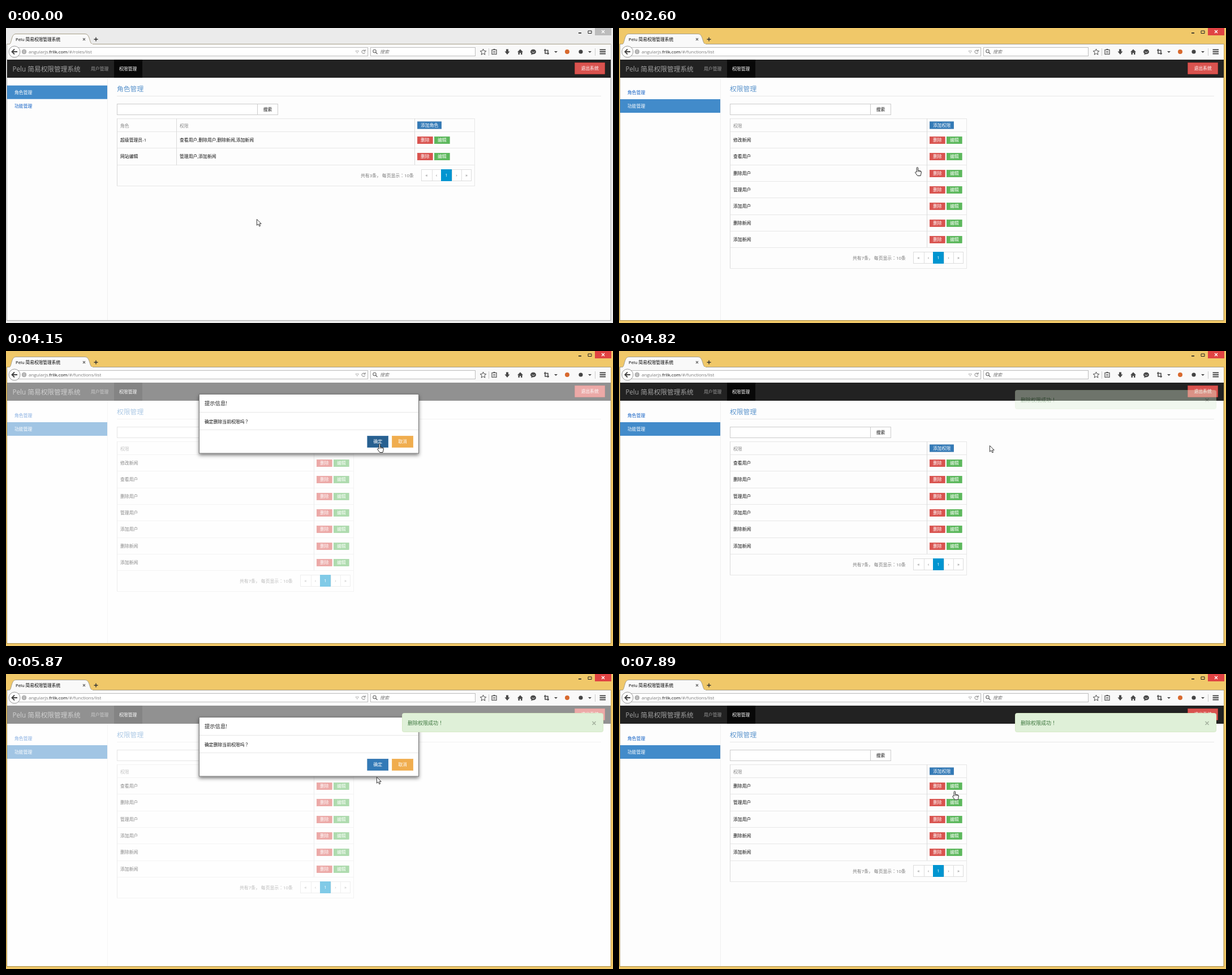
Recreate the animation shown at these times as an HTML page. Size 1073 by 522 pixels, loop 8000 ms.

```html
<!DOCTYPE html>
<html lang="zh-CN">
<head>
<meta charset="utf-8">
<title>权限管理</title>
<style>
html, body { margin: 0; width: 100%; height: 100%; overflow: hidden; background: #ebebeb; }
svg { display: block; width: 1073px; height: 522px; }
text { font-family: "Open Sans", "Noto Sans CJK SC", "Noto Sans CJK", sans-serif; white-space: pre; }
.mark { font-family: "Noto Sans CJK TC", "Noto Sans CJK", sans-serif; }
</style>
</head>
<body>
<svg id="stage" viewBox="0 0 1073 522" xmlns="http://www.w3.org/2000/svg"></svg>
<script>
const FS = 7.84;
const RED = '#d9534f', GREEN = '#5cb85c', BLUE = '#337ab7', LINE = '#e7e7e7', BAR = '#dadada';
const EDGE = { [RED]: '#d43f3a', [GREEN]: '#4cae4c', [BLUE]: '#2e6da4' };

// these marks sit in the middle of their square
const marks = s => s.replace(/[：？！]/g, '<tspan class="mark" lang="zh-TW">$&</tspan>');
// y is the vertical middle of the glyphs
const text = (x, y, s, fill = '#111', size = FS, more = '') =>
  `<text x="${x}" y="${(y + size * .37).toFixed(2)}" font-size="${size}" fill="${fill}" ${more}>${marks(s)}</text>`;
const mid = (x, y, s, fill, size, more = '') => text(x, y, s, fill, size, 'text-anchor="middle" ' + more);
const rect = (x, y, w, h, fill, more = '') =>
  `<rect x="${x}" y="${y}" width="${w}" height="${h}" fill="${fill}" ${more}/>`;
const frame = (x, y, w, h, color, fill = '#fff') => rect(x + .5, y + .5, w - 1, h - 1, fill, `stroke="${color}"`);
const hline = (x1, x2, y, c = LINE) => rect(x1, y, x2 - x1, 1, c);
const vline = (x, y1, y2, c = LINE) => rect(x, y1, 1, y2 - y1, c);
const path = (d, stroke, fill = 'none', w = 1, more = '') =>
  `<path d="${d}" stroke="${stroke}" fill="${fill}" stroke-width="${w}" ${more}/>`;
const dot = (x, y, r, fill, more = '') => `<circle cx="${x}" cy="${y}" r="${r}" fill="${fill}" ${more}/>`;
const group = (id, body, more = '') => `<g id="${id}" ${more}>${body}</g>`;
const plate = (x, y, w, h, fill, more = '') =>
  rect(x + .3, y + .3, w - .6, h - .6, fill, `stroke="${EDGE[fill] || fill}" stroke-width=".6" ${more}`);
const button = (x, y, w, h, s, fill, more = '') =>
  plate(x, y, w, h, fill, more) + mid(x + w / 2, y + h / 2, s, '#fff', FS, 'font-weight="500"');

const APP = 'Pelu 简易权限管理系统';
const HOST = '<tspan fill="#777">angularjs.</tspan><tspan fill="#111" font-weight="500">frllk.com</tspan>';

function toolbar() {
  const ink = '#4a4a4a';
  const caret = x => path(`M${x - 3} 41h6l-3 3z`, 'none', ink);
  return rect(2, 28, 1067, 28, '#f9f9f9')
    + path('M2 28.5H6C10 28.5 9 10.5 17 10.5H140C149 10.5 147 28.5 153 28.5H1069', '#a8a08a', '#f9f9f9')
    + rect(7, 28, 146, 2, '#f9f9f9')
    + text(17, 20, APP, '#000', 7.7)
    + path('M136 18l4 4m0-4l-4 4', '#666', 'none', 1.1)
    + path('M155.5 20h7M159 16.5v7', '#333', 'none', 1.4)
    + frame(18, 34, 622, 16, '#bdbdbd')
    + dot(15, 42, 10, '#fdfdfd', 'stroke="#999"')
    + path('M20 42H11M15 37.5L10.5 42l4.5 4.5', '#444', 'none', 1.9)
    + dot(32, 42, 4.2, '#999')
    + path('M28 42h8M32 38v8M29 40h6M29 44h6', '#eee', 'none', .6)
    + path('M618 40.5h5.5l-2.7 4z', '#aaa', 'none', .8)
    + path('M634.5 40.5a3 3 0 1 0 .3 2.8M635 38v3h-3', '#777')
    + frame(644, 34, 186, 16, '#bdbdbd')
    + dot(651.5, 41, 2.7, 'none', 'stroke="#666" stroke-width="1.1"')
    + path('M653.5 43l3 3', '#666', 'none', 1.3)
    + text(661, 42, '搜索', '#777', 8, 'font-style="italic"')
    + path('M843.5 37l1.5 3.5 3.8.4-2.9 2.5.9 3.8-3.3-2-3.3 2 .9-3.8-2.9-2.5 3.8-.4z', ink)
    + vline(853, 36, 49, '#ccc')
    + path('M859 38.5h8v8h-8zM861 41.5h4M861 44h4', ink, 'none', 1.2) + rect(861.5, 37, 3, 2, ink)
    + path('M884 37.5h4v4h2.5l-4.5 5.5-4.5-5.5h2.5z', 'none', ink)
    + path('M904 42.5l5-5 5 5h-1.5v4.5h-2.5v-3h-2v3h-2.5v-4.5z', 'none', ink)
    + `<ellipse cx="932" cy="42" rx="5" ry="4.3" fill="${ink}"/>`
    + path('M929.5 42q2.5 3 5 0', '#fff', 'none', .8) + path('M929 45l-1 2.5 4-1.5z', 'none', ink)
    + path('M953 37v8h7M951 39.5h7v7.5', ink, 'none', 1.6)
    + caret(972) + dot(992, 42, 4, '#d8692e') + dot(1016, 42, 3.6, '#444') + caret(1032)
    + vline(1041, 36, 49, '#ccc')
    + path('M1049.5 38.5h10.5M1049.5 42h10.5M1049.5 45.5h10.5', ink, 'none', 1.8);
}

function chrome() {
  return rect(0, 0, 1073, 522, '#ebebeb', 'id="skin"')
    + rect(1041, 0, 29, 13, '#bcbcbc', 'id="close"')
    + path('M1053 4l5 5m0-5l-5 5', '#fff', 'none', 1.3)
    + rect(1012, 8, 5, 1.6, '#222')
    + path('M1029 5h6v4.5h-6z', '#222')
    + rect(1.5, 28.5, 1067.5, 489, '#fdfdfd', 'id="edge" stroke="#aaa"')
    + toolbar()
    + `<text x="40" y="45" font-size="8" fill="#777">${HOST}/#/<tspan id="route"></tspan></text>`;
}

function navbar() {
  return rect(2, 56, 1067, 32, '#222')
    + text(11.5, 72.5, APP, '#a0a0a0', 11.7)
    + text(150, 72, '用户管理', '#999')
    + rect(191, 56, 50, 32, '#080808') + text(200, 72, '权限管理', '#fff', FS, 'font-weight="500"')
    + button(1005.4, 61, 53.4, 20.8, '退出系统', RED);
}

function table(x2, bar, rows, total, add, head, cell) {
  const rowY = i => Math.round(184 + i * 29.35) - 1;
  const foot = rowY(rows.length), end = foot + 37;
  let out = head + plate(bar + 5, 165.5, 43, 13, BLUE) + text(bar + 11, 172, add, '#fff', FS, 'font-weight="500"');
  rows.forEach((r, i) => {
    const cy = rowY(i) + 15.5;
    out += hline(196, x2, rowY(i)) + cell(r, cy)
      + button(bar + 5, cy - 6.5, 27.5, 13, '删除', RED, i ? '' : 'class="del"')
      + button(bar + 35, cy - 6.5, 27.5, 13, '编辑', GREEN);
  });
  out += hline(196, x2, 160) + hline(196, x2, foot) + hline(196, x2, end)
    + vline(196, 160, end, BAR) + vline(x2 - 1, 160, end) + vline(bar, 160, foot, BAR);
  const py = foot + 8, stops = [0, 19, 35, 54, 71, 89];
  out += text(x2 - 202, py + 11, `共有${total}条， 每页显示：10条`, '#777');
  ['«', '‹', '1', '›', '»'].forEach((s, i) => {
    const px = x2 - 95 + stops[i], w = stops[i + 1] - stops[i], on = i === 2;
    out += (on ? rect(px, py, w, 21, '#0095d0') : frame(px, py, w + (i === 4 ? 0 : 1), 21, '#ddd'))
      + mid(px + w / 2, py + 10.5, s, on ? '#fff' : '#777', 8);
  });
  return out;
}

function side(y, s, on, hot = '') {
  return (on ? rect(2, y, 177, 24, '#428bca') : '')
    + text(15, y + 12.5, s, on ? '#fff' : '#0f5fc4', FS, `${hot} font-weight="500"`);
}

function rolesView() {
  const rows = [['超级管理员-1', '查看用户,删除用户,删除新闻,添加新闻'], ['网站编辑', '管理用户,添加新闻']];
  return rect(2, 126, 177, 24, '#e9e9ea', 'id="hot"')
    + side(101.7, '角色管理', true) + side(126, '功能管理', false, 'id="link"')
    + text(196, 108, '角色管理', '#5b94cc', 11.8)
    + table(829, 722, rows, 3, '添加角色',
      text(202, 173, '角色', '#888') + text(307, 173, '权限', '#888'),
      (r, y) => text(202, y, r[0]) + text(307, y, r[1]))
    + vline(301, 160, 243, BAR);
}

const RIGHTS = ['修改新闻', '查看用户', '删除用户', '管理用户', '添加用户', '删除新闻', '添加新闻'];
function rightsView(skip) {
  return side(101.7, '角色管理', false) + side(126, '功能管理', true)
    + text(196, 108, '权限管理', '#5b94cc', 11.8)
    + table(615, 544, RIGHTS.slice(skip), 7, '添加权限',
      text(202, 173, '权限', '#888'), (r, y) => text(202, y, r));
}

function dialog() {
  return rect(341.5, 76.5, 388, 104.5, '#fff', 'stroke="#777" filter="url(#shade)"')
    + text(351, 92.5, '提示信息!', '#222', 9.3) + hline(342, 729, 108)
    + text(351, 125, '确定删除当前权限吗？') + hline(342, 729, 139)
    + button(638.5, 150, 37.5, 21, '确定', BLUE, 'id="ok"')
    + button(682, 150, 38, 21, '取消', '#f0ad4e');
}

const stage = document.getElementById('stage');
stage.innerHTML = `<defs><filter id="shade" x="-10%" y="-20%" width="120%" height="150%">
  <feDropShadow dx="0" dy="3" stdDeviation="3" flood-opacity=".5"/></filter>
  <clipPath id="page">${rect(2, 56, 1067, 461, '#000')}</clipPath></defs>`
  + chrome() + navbar()
  + vline(179, 88, 517, '#eee') + hline(196, 1052, 120, '#e8e8e8')
  + frame(196, 134, 249, 20, '#ccc') + frame(444, 134, 37, 20, '#ccc') + mid(462.5, 144, '搜索')
  + group('v0', rolesView()) + [0, 1, 2].map(k => group('v' + (k + 1), rightsView(k))).join('')
  + group('status', frame(1, 503, 135, 15, '#ccc', '#f6f6f6')
    + text(4, 510.5, 'angularjs.frllk.com/#/functions/list', '#666', 8))
  + rect(2, 56, 1067, 461, '#fff', 'id="veil"')
  + `<g clip-path="url(#page)">${group('dialog', dialog())}</g>`
  + group('alert', rect(700.5, 69.5, 355, 33, '#dff0d8', 'rx="3" stroke="#d6e9c6"')
    + text(710, 86.5, '删除权限成功！', '#3c763d', 9)
    + path('M1036.5 84l6 6m0-6l-6 6', '#a3b09e', 'none', 1.5))
  + group('arrow', path('M.4 .5V11.2l2.6-2.3 1.8 4 1.8-.8-1.7-3.8h3.3z', '#222', '#fff', .9))
  + group('hand', path('M3.2 9V1.7Q3.3.5 4.4.5T5.6 1.7V6L10 7Q11.5 7.4 11.4 9L10.8 12.5 10 15.5H4.8L1 10.5Q.1 9 1.4 8.7z', '#222', '#fff')
    + path('M5.6 6v3M7.6 6.5v2.5M9.5 7v2', '#222', 'none', .7));

const $ = id => document.getElementById(id);
const show = (id, on) => $(id).setAttribute('display', on ? 'inline' : 'none');
const fade = (id, v) => { $(id).setAttribute('opacity', v); show(id, v > 0); };

const times = [0];
for (const [a, b, n] of [[280, 1280, 8], [1440, 2460, 9], [2600, 3640, 8], [3760, 4690, 8],
  [4820, 5750, 8], [5870, 6800, 8], [6920, 7890, 8]])
  for (let k = 0; k < n; k++) times.push(a + (b - a) * k / (n - 1));

const A = 'arrow', H = 'hand';
const moves = [[0, 443, 338, A], [150, 443, 338, A], [1280, 30, 139, A], [1440, 28, 139, H], [1820, 28, 139, A],
  [2440, 500, 262, H], [2600, 523, 246, H], [2980, 560, 196, H], [3630, 560, 196, A], [4040, 656, 164, H],
  [4680, 656, 164, A], [4820, 655, 167, A], [5330, 560, 196, H], [5600, 560, 196, A], [5870, 655, 182, A],
  [6000, 656, 166, H], [6790, 656, 165, A], [7180, 612, 240, H], [7750, 589, 207, H], [8000, 589, 207, H]];
const modal = [[0, 0], [3630, 0], [3640, .3], [3760, 1], [4550, 1], [4690, .5], [4815, 0], [5740, 0],
  [5750, .3], [5870, 1], [6650, 1], [6667, .5], [6790, 0], [8000, 0]];
const notice = [[0, 0], [4800, 0], [4820, .4], [4950, 1], [6800, 1], [6920, .4], [7050, 1], [8000, 1]];

function at(keys, t) {
  let i = 0;
  while (i < keys.length - 2 && keys[i + 1][0] <= t) i++;
  const a = keys[i], b = keys[i + 1], u = (t - a[0]) / (b[0] - a[0]);
  return { key: a, mix: (j, e = u) => a[j] + (b[j] - a[j]) * e, ease: u * u * (3 - 2 * u) };
}

function draw(now) {
  const t = times.filter(s => s <= now + 15).pop();
  const live = t >= 1440;
  $('skin').setAttribute('fill', live ? '#f0c869' : '#ebebeb');
  $('edge').setAttribute('stroke', live ? '#a78c4b' : '#aaa');
  $('close').setAttribute('fill', live ? '#e04343' : '#bcbcbc');

  const view = t < 1690 ? 0 : t < 4810 ? 1 : t < 6790 ? 2 : 3;
  for (let k = 0; k < 4; k++) show('v' + k, k === view);
  $('route').textContent = view ? 'functions/list' : 'roles/list';
  show('hot', live);
  show('status', live && !view);
  $('link').setAttribute('fill', t > 1270 ? '#23408e' : '#0f5fc4');

  const p = at(modal, t).mix(1);
  fade('veil', p * .5);
  fade('dialog', p);
  $('dialog').setAttribute('transform', `translate(0 ${-25 * (1 - p)})`);
  fade('alert', at(notice, t).mix(1));

  const m = at(moves, t), x = m.mix(1, m.ease), y = m.mix(2, m.ease), kind = m.key[3];
  for (const c of [A, H]) show(c, c === kind);
  $(kind).setAttribute('transform', `translate(${x.toFixed(1)} ${y.toFixed(1)})`);

  const tip = kind === H ? x + 4 : x;
  const over = (x1, y1, x2, y2) => tip > x1 && tip < x2 && y > y1 && y < y2;
  const del = !p && over(549, 192, 577, 205) ? '#c12e2a' : RED;
  document.querySelectorAll('.del').forEach(e => e.setAttribute('fill', del));
  $('ok').setAttribute('fill', over(638, 150, 676, 171) ? '#286090' : BLUE);
}

const start = performance.now();
function tick() {
  draw((performance.now() - start) % 8000);
  requestAnimationFrame(tick);
}
tick();
</script>
</body>
</html>
```
